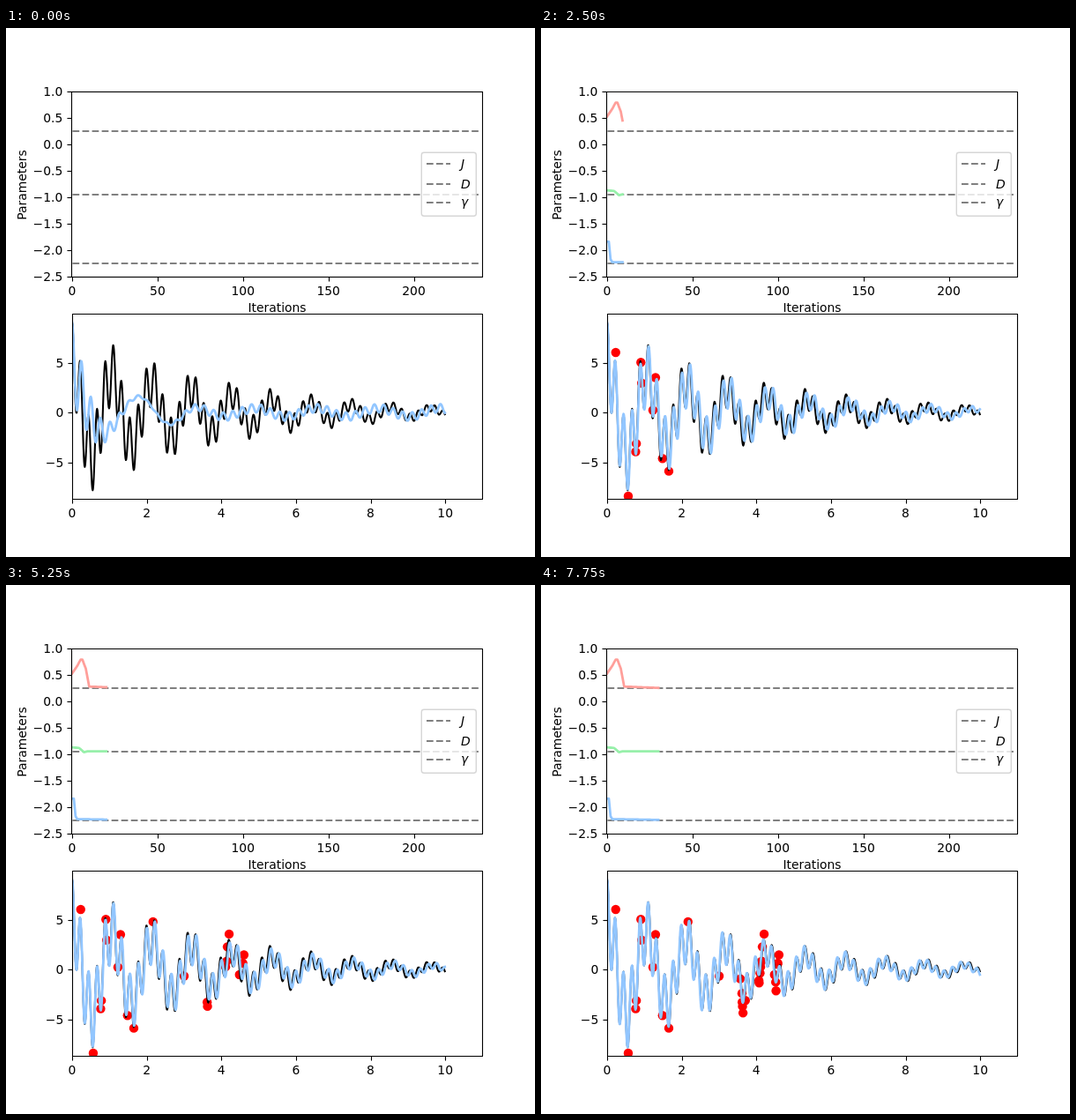
Animation of 600x600 px, one loop 8000 ms. Source, as an HTML page with a canvas:

```html
<!DOCTYPE html>
<html lang="en">
<head>
<meta charset="utf-8">
<title>Parameter fit</title>
<style>
  html, body { margin: 0; width: 100%; height: 100%; overflow: hidden; background: #fff; }
  canvas { display: block; width: 600px; height: 600px; }
</style>
</head>
<body>
<canvas id="stage" width="600" height="600"></canvas>
<script>
const ctx = document.getElementById('stage').getContext('2d');
const STEP = 250, STEPS = 32;
const FONT = '13.89px "DejaVu Sans", sans-serif';
const GRAY = '#808080', BLUE = '#92c6ff', GREEN = '#97f0aa', RED = '#ff9f9a';
const DASH = [7.71, 3.33];
const TAU = 2 * Math.PI;
const T_END = 9.99;

const iterX = i => 75 + i * 1.9375;
const paramY = v => 132 - v * 60;
const timeX = t => 75 + t * 465 / (1.1 * T_END);
const signalY = v => 436 - v * 11.3;

// Key points of each estimate: iteration, value.
const traces = [
  [BLUE, [[0, -1.84], [1, -1.84], [2, -2.17], [3, -2.225], [30, -2.24]]],
  [GREEN, [[0, -0.87], [4, -0.88], [7, -0.96], [9, -0.945]]],
  [RED, [[0, 0.53], [3, 0.67], [5, 0.79], [6, 0.79], [8, 0.62], [10, 0.28], [30, 0.255]]]
];

// Fitted model: step, decay, slow frequency, half the fast frequency.
const fits = [
  [1, 0.8, 0.97, 2.05], [4, 0.85, 1.03, 2.18], [8, 0.72, 0.944, 2.252],
  [10, 0.27, 0.92, 2.246], [26, 0.265, 0.93, 2.253], [31, 0.253, 0.941, 2.27]
];

// Linear between key points, holding the last value.
function between(keys, x) {
  let i = 1;
  while (i < keys.length - 1 && keys[i][0] < x) i++;
  const a = keys[i - 1], b = keys[i];
  const u = Math.min(1, (x - a[0]) / (b[0] - a[0]));
  return a.slice(1).map((v, k) => v + (b[k + 1] - v) * u);
}

const signal = (decay, slow, fast) => t =>
  Math.exp(-decay * t) * (5 * Math.cos(TAU * slow * t) + 4 * Math.cos(2 * TAU * fast * t));

// Average over many models: a quick loss of phase, then a small leftover beat.
function prior(t) {
  const early = Math.exp(-((t / 3.1) ** 6)), late = 0.42 * (1 - early);
  const slow = (3.4 * Math.exp(-2.5 * t) + 1.6 * early) * Math.cos(TAU * t / 1.8)
    + late * Math.cos(TAU * (t - 6.55) / 1.65);
  const fast = 4 * Math.exp(-1.1 * t - 0.5 * t * t) + late;
  return slow + fast * Math.cos(TAU * 3.95 * t);
}

const truth = signal(0.25, 0.936, 2.2635);

// Measuring times spread outwards, then cycle through three late spots.
function measureTime(i) {
  if (i < 4) return 0.24 + 0.33 * i;
  if (i < 8) return 0.76 + 0.02 * (i - 4) ** 3;
  if (i < 13) return 1.48 + 0.17 * (i - 8) ** 2;
  return 3.64 + 0.45 * (i % 3);
}

let seed = 7;
function noise(size) {
  seed = (seed * 16807) % 2147483647;
  return (seed / 2147483647 * 2 - 1) * size;
}

const dots = Array.from({ length: STEPS - 1 }, (_, i) => {
  const t = measureTime(i) + noise(i < 13 ? 0.01 : 0.08);
  return [timeX(t), signalY(truth(t) + noise(1.6))];
});

function line(points, color, width, dash = []) {
  ctx.strokeStyle = color;
  ctx.lineWidth = width;
  ctx.lineJoin = 'round';
  ctx.lineCap = dash.length ? 'butt' : 'square';
  ctx.setLineDash(dash);
  ctx.beginPath();
  points.forEach(([x, y]) => ctx.lineTo(x, y));
  ctx.stroke();
  ctx.setLineDash([]);
}

function curve(fn, color, width) {
  const points = [];
  for (let t = 0; t <= T_END; t += 0.01) points.push([timeX(t), signalY(fn(t))]);
  line(points, color, width);
}

function text(str, x, y, align = 'center', style = '') {
  ctx.fillStyle = '#000';
  ctx.font = style + FONT;
  ctx.textAlign = align;
  ctx.fillText(str, x, Math.round(y));
}

const label = (v, digits) => v.toFixed(digits).replace('-', '\u2212');
const snap = v => Math.round(v) + 0.5;

function axes(left, top, xTicks, toX, yTicks, toY, digits) {
  const bottom = top + 210;
  ctx.strokeStyle = '#000';
  ctx.lineWidth = 1.11;
  ctx.strokeRect(left + 0.5, top + 0.5, 540 - left, 210);
  for (const v of xTicks) {
    const x = toX(v);
    line([[snap(x), bottom + 1], [snap(x), bottom + 5]], '#000', 1.11);
    text(label(v, 0), x, bottom + 21);
  }
  for (const v of yTicks) {
    const y = toY(v);
    line([[left - 4, snap(y)], [left, snap(y)]], '#000', 1.11);
    text(label(v, digits), left - 9.7, y + 5, 'right');
  }
}

function clipped(top, paint) {
  ctx.save();
  ctx.beginPath();
  ctx.rect(75, top, 465, 210);
  ctx.clip();
  paint();
  ctx.restore();
}

function legend() {
  ctx.fillStyle = 'rgba(255,255,255,0.8)';
  ctx.strokeStyle = 'rgba(204,204,204,0.8)';
  ctx.lineWidth = 1.39;
  ctx.beginPath();
  ctx.roundRect(471.3, 141.3, 62, 72, 2.8);
  ctx.fill();
  ctx.stroke();
  [['J', 154, 159], ['D', 177, 182], ['\u03b3', 198, 202]].forEach(([name, y, base]) => {
    line([[477, y], [504, y]], GRAY, 2.08, DASH);
    text(name, 516, base, 'left', 'italic ');
  });
}

function draw(step) {
  ctx.fillStyle = '#fff';
  ctx.fillRect(0, 0, 600, 600);

  clipped(72, () => {
    for (const v of [0.25, -0.95, -2.25]) {
      line([[75.5, paramY(v)], [538, paramY(v)]], GRAY, 2.08, DASH);
    }
    if (step < 2) return;
    for (const [color, keys] of traces) {
      const points = [];
      for (let i = 0; i < step; i++) points.push([iterX(i), paramY(between(keys, i)[0])]);
      line(points, color, 2.78);
    }
  });
  axes(74, 72, [0, 50, 100, 150, 200], iterX, [1, 0.5, 0, -0.5, -1, -1.5, -2, -2.5], paramY, 1);
  legend();
  text('Iterations', 307.5, 322);
  ctx.save();
  ctx.translate(23, 178);
  ctx.rotate(-Math.PI / 2);
  text('Parameters', 0, 0);
  ctx.restore();

  clipped(324, () => {
    ctx.fillStyle = '#f00';
    for (const [x, y] of dots.slice(0, step)) {
      ctx.beginPath();
      ctx.arc(x, y, 5.2, 0, TAU);
      ctx.fill();
    }
    curve(truth, '#000', 2.08);
    curve(step ? signal(...between(fits, step)) : prior, BLUE, 2.78);
  });
  axes(75, 324, [0, 2, 4, 6, 8, 10], timeX, [5, 0, -5], signalY, 0);
}

let shown = -1;
function tick() {
  const step = Math.floor(performance.now() / STEP) % STEPS;
  if (step !== shown) draw(shown = step);
  requestAnimationFrame(tick);
}
tick();
</script>
</body>
</html>
```
